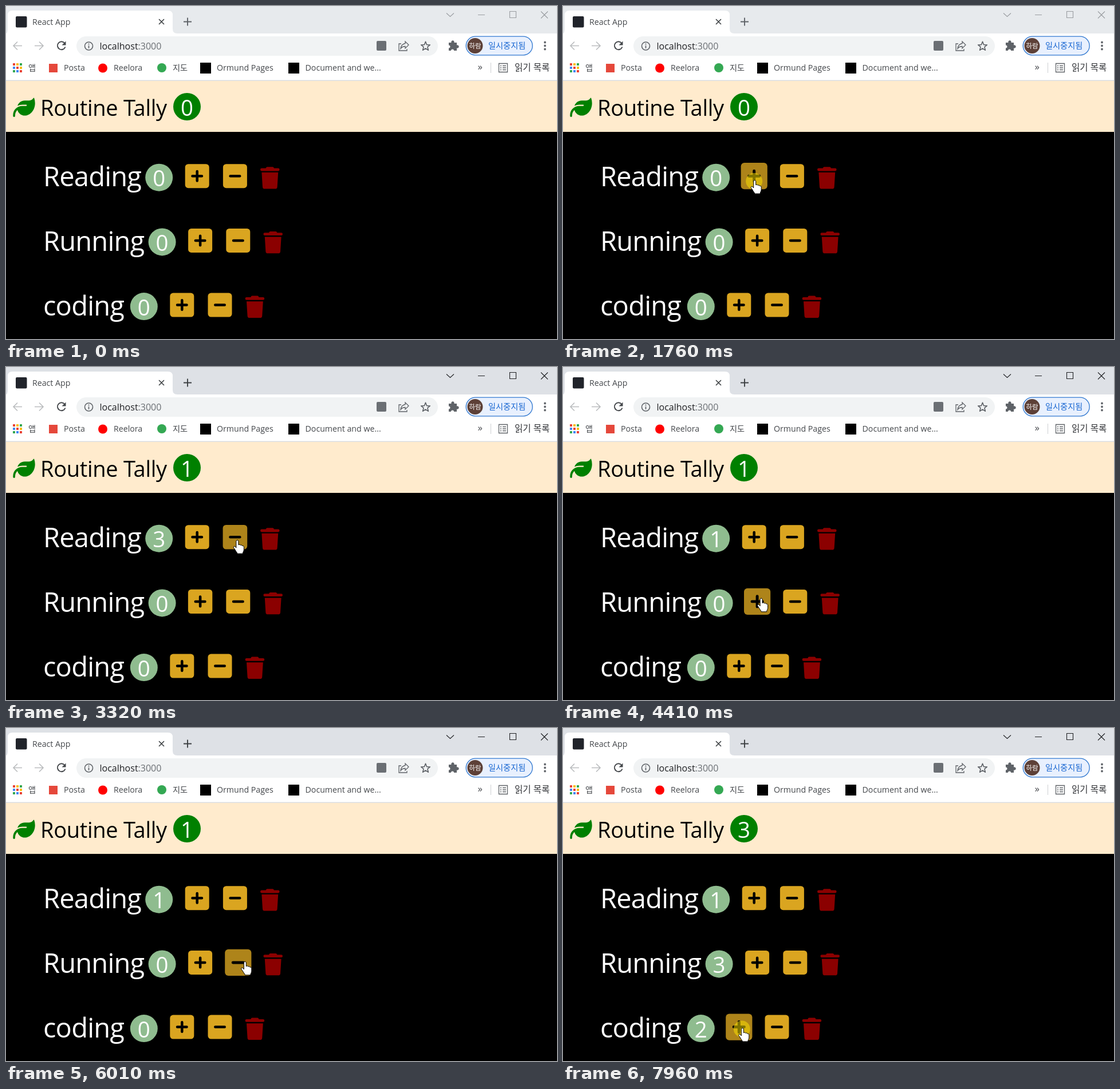
An HTML page for the animation above (8000 ms loop, 962 px wide and 582 px high).

```html
<!DOCTYPE html>
<html lang="ko">
<head>
<meta charset="utf-8">
<title>React App</title>
<style>
  html, body { margin: 0; width: 100%; height: 100%; overflow: hidden; background: #000; }
  svg { display: block; width: 100vw; height: 100vh; }
  text { font-family: "Open Sans", "Noto Sans", "Noto Sans CJK KR", sans-serif; }
  .ko { font-family: "Noto Sans CJK KR", "Noto Sans CJK", sans-serif; }
  .label { font-size: 14.2px; fill: #45484c; }
  .name { font-size: 47px; letter-spacing: -.8px; fill: #fff; }
  .count { font-size: 38.4px; fill: #fff; text-anchor: middle; }
  .line { fill: none; stroke: #5f6368; stroke-width: 1.6; }
  .thin { stroke-width: 1.3; }
  .bold { stroke: #45484c; stroke-width: 1.9; }
  .off { stroke: #babcbe; }
</style>
</head>
<body>
<svg viewBox="0 0 962 582" preserveAspectRatio="none">
  <defs>
    <path id="trash" fill="#8b0000" d="M135 18L128 32H32a32 32 0 0 0 0 64H416a32 32 0 0 0 0-64H320l-7-14q-9-18-29-18H164q-20 0-29 18zM416 128H32L53 467a48 48 0 0 0 48 45H347a48 48 0 0 0 48-45z"/>
  </defs>
  <rect width="962" height="582"/>
  <rect id="strip" width="962" height="49"/>
  <path d="M0 48Q3 47 3 40V16Q3 8 11 8H283Q291 8 291 16V40Q291 48 299 48Z" fill="#fff"/>
  <rect y="48" width="962" height="82" fill="#fff"/>
  <rect y="129.5" width="962" height="1.5" fill="#dadce0"/>

  <!-- Tab -->
  <rect x="17" y="18" width="19.5" height="19.5" rx="2" fill="#20232a"/>
  <text x="46" y="33" class="label">React App</text>
  <path d="M267 23l9 9m0-9l-9 9" class="line" style="stroke:#3c4043"/>
  <path id="newTab" d="M310 27.5h14m-7-7v14" fill="none" stroke-width="1.9"/>
  <path id="controls" fill="none" stroke-width="1.1" d="M769 12.5l6.500 6 6.500-6M824 15.500h12M879.500 9.500h11v11h-11zM934 9.500l12 12m0-12l-12 12"/>

  <!-- Toolbar -->
  <path d="M28 69.500H13m7-7l-7 7 7 7M50 69.500h15m-7-7l7 7-7 7" class="line off"/>
  <path d="M102.500 65A7 7 0 1 0 103.500 71.500" class="line bold"/>
  <path d="M104.500 61.500v7h-7z" fill="#45484c"/>
  <rect x="123" y="53" width="631" height="34" rx="17" fill="#f1f3f4"/>
  <circle cx="144.500" cy="70" r="7" class="line"/>
  <path d="M144.500 69v5m0-8.500v2" class="line"/>
  <text x="163.500" y="75.500" font-size="16" fill="#202124">localhost<tspan fill="#6b6f74">:3000</tspan></text>
  <rect x="647" y="61" width="17" height="17" rx="2" fill="#6b6f74"/>
  <path d="M690 66h-4v12h14v-3M703 68l-6-6v3.500q-7 1-8 9 3-4 8-4v3.500z" class="line thin"/>
  <path id="star" class="line" stroke-linejoin="round"/>
  <path d="M773 64h4.500a2.700 2.700 0 1 1 5 0H787v4.500a2.700 2.700 0 1 1 0 5V78h-5a2.500 2.500 0 0 0-5 0h-4v-4.500a2.500 2.500 0 0 0 0-5z" fill="#5f6368"/>
  <rect x="803.200" y="53.200" width="116" height="32.600" rx="16.300" fill="#e8f0fe" stroke="#2f77cf" stroke-width="1.300"/>
  <circle cx="819" cy="69.500" r="13.500" fill="#5d4037"/>
  <text x="819" y="74" class="ko" font-size="11.500" fill="#fff" text-anchor="middle">하람</text>
  <text x="842" y="74" class="ko" font-size="14.200" fill="#1967d2">일시중지됨</text>
  <path d="M941 63.500v12.100" stroke="#5f6368" stroke-width="3.800" stroke-linecap="round" stroke-dasharray="0 6"/>

  <!-- Bookmarks -->
  <g id="apps"></g>
  <text x="39" y="113" class="label ko">앱</text>
  <rect x="75" y="101" width="15" height="15" fill="#e5483b"/>
  <text x="101" y="113" class="label">Posta</text>
  <circle cx="169" cy="108.500" r="8" fill="#f00"/>
  <text x="188" y="113" class="label">Reelora</text>
  <circle cx="272" cy="108" r="8" fill="#34a853"/>
  <text x="291" y="113" class="label ko">지도</text>
  <rect x="339" y="99" width="19" height="19"/>
  <text x="368" y="113" class="label">Ormund Pages</text>
  <rect x="493" y="99" width="19" height="19"/>
  <text x="522.500" y="113" class="label">Document and we...</text>
  <text x="823.500" y="112" font-size="17" fill="#45484c">»</text>
  <path d="M846.500 99v18" stroke="#cfd1d4"/>
  <path d="M860.500 100.500h15v15h-15zM863 104.500h2m2 0h6M863 108h2m2 0h6M863 111.500h2m2 0h6" class="line thin"/>
  <text x="888" y="113" class="ko" font-size="15.500" fill="#303236">읽기 목록</text>

  <!-- App header -->
  <rect y="131" width="962" height="89" fill="#ffebcd"/>
  <path transform="translate(12.300 158) scale(.075)" fill="green" d="M272 96c-79 0-145 52-168 123q50-27 112-27h88a16 16 0 0 1 0 32h-88C90 224 0 320 0 440v16a24 24 0 0 0 48 0v-16q2-74 54-123c20 75 88 131 170 131 133 0 240-131 240-291q0-63-21-120-6-10-16 0c-19 35-57 59-99 59z"/>
  <text x="60" y="191.500" font-size="38" letter-spacing="-.3">Routine Tally</text>
  <circle cx="316" cy="176" r="24" fill="green"/>
  <text id="total" x="316" y="191.500" class="count">0</text>

  <g id="rows"></g>
  <circle id="halo" r="14.500" fill="#ffe600" opacity=".5"/>
  <g id="cursor" fill="#fff" stroke="#000" stroke-linejoin="round">
    <path id="hand" d="M-1 0q2-3.500 4 0v6.500q2.500-1.500 3.500.6 2-1.200 3 1 2-.8 3 1.800v5c0 3-2 4-2 7H1c0-2-2-3-4-7l-2.500-3.500q0-3.500 3-1.600l1.500 2z"/>
    <path id="arrow" d="M0 0v17l4-3.700 2.600 6 2.700-1.100-2.600-5.900H12z"/>
  </g>
</svg>
<script>
const LOOP = 8000;
const HOLD = 70;    // how long the mouse button stays down
const EDGE = 60;    // the pointer crosses a button's border this long before and after a stop
const GROW = 300;   // hover transition

const $ = id => document.getElementById(id);
const clamp = v => Math.min(1, Math.max(0, v));
const smooth = x => x * x * (3 - 2 * x);
const ease = x => 1 - (1 - smooth(clamp(x))) ** 1.7;

const habits = [["Reading", 267.2], ["Running", 272.6], ["coding", 240.8]]
  .map(([name, x], i) => ({ name, x, y: 297.2 + 112.7 * i }));

const button = (row, sign) => ({
  row, sign,
  x: habits[row].x + (sign > 0 ? 66.5 : 132.7),
  y: habits[row].y
});
const buttons = habits.flatMap((_, row) => [button(row, 1), button(row, -1)]);

// A stay of the pointer on a button, off its centre by dx, dy, with its clicks
function stop(row, sign, dx, dy, from, to, ...presses) {
  const target = buttons.find(b => b.row === row && b.sign === sign);
  return { target, x: target.x + dx, y: target.y + dy, from, to, presses };
}
const stops = [
  stop(2, -1, 2, -3, 1070, 1070),
  stop(0, 1, 0, 9, 1490, 2420, 1760, 2030, 2350),
  stop(0, -1, 0, 9, 2620, 2720),
  stop(1, 1, 8, 7, 2960, 3060),
  stop(0, -1, 3, 7, 3325, 3940, 3600, 3870),
  stop(1, 1, 6, -4, 4200, 5070, 4540, 4740),
  stop(1, -1, 11, 0, 5340, 6010, 5410, 5740, 5940),
  stop(1, 1, 4, 5, 6280, 6890, 6410, 6610, 6820),
  stop(2, 1, 5, 3.5, 7360, LOOP, 7500, 7700, 7960)
];
const clicks = stops.flatMap(s => s.presses.map(time => ({ time, ...s.target })));
const enterTime = stops[0].from - EDGE;
const focusTime = clicks[0].time + HOLD;

function pointer(t) {
  const i = stops.findIndex(s => t < s.to);
  const b = stops[i], a = stops[i - 1] || b;
  const k = smooth(clamp((t - a.to) / (b.from - a.to)));
  return [a.x + (b.x - a.x) * k, a.y + (b.y - a.y) * k];
}

const drawButton = ({ sign }) => `<g class="btn">
  <rect x="-21" y="-21" width="42" height="42" rx="5.5"/>
  <path d="M-8.25 0H8.25${sign > 0 ? "M0-8.25V8.25" : ""}" stroke="#000" stroke-width="4.5" stroke-linecap="round"/></g>`;

$("rows").innerHTML = habits.map(({ name, x, y }) => `
  <text x="65" y="${y + 18}" class="name">${name}</text>
  <circle cx="${x}" cy="${y + 2.5}" r="24" fill="#8fbc8f"/>
  <text x="${x}" y="${y + 18}" class="count num">0</text>
  <use href="#trash" transform="translate(${x + 176.8} ${y - 16}) scale(.075)"/>`).join("")
  + buttons.map(drawButton).join("");

const hues = ["#ea4335", "#fbbc04", "#34a853", "#4285f4"];
$("apps").innerHTML = Array.from({ length: 9 }, (_, i) =>
  `<rect x="${12 + i % 3 * 6}" y="${100 + Math.floor(i / 3) * 6}" width="4" height="4" fill="${hues[i % 4]}"/>`).join("");

$("star").setAttribute("d", "M" + Array.from({ length: 10 }, (_, i) => {
  const r = i % 2 ? 3.6 : 8.3, a = i * Math.PI / 5;
  return `${732.5 + r * Math.sin(a)} ${70.5 - r * Math.cos(a)}`;
}).join("L") + "Z");

const shapes = [...document.querySelectorAll(".btn")];
const numbers = [...document.querySelectorAll(".num")];
const set = (el, name, value) => el.setAttribute(name, value);
const show = (id, on) => set($(id), "visibility", on ? "visible" : "hidden");

function drawWindow(focused) {
  set($("strip"), "fill", focused ? "#dee1e6" : "#e7eaed");
  set($("controls"), "stroke", focused ? "#202124" : "#9a9da1");
  set($("newTab"), "stroke", focused ? "#3c4043" : "#5f6368");
}

function drawCounts(t) {
  const counts = habits.map(() => 0);
  for (const c of clicks)
    if (t >= c.time + HOLD) counts[c.row] = Math.max(0, counts[c.row] + c.sign);
  numbers.forEach((n, i) => n.textContent = counts[i]);
  $("total").textContent = counts.filter(c => c > 0).length;
}

function drawButtons(t) {
  buttons.forEach((b, i) => {
    let grow = 0, hot = false;
    for (const s of stops.filter(s => s.target === b)) {
      const on = s.from - EDGE, off = s.to + EDGE;
      grow += ease((t - on) / GROW) - ease((t - off) / GROW);
      hot = hot || (t >= on && t < off);
    }
    set(shapes[i], "transform", `translate(${b.x} ${b.y}) scale(${1 + .1 * grow})`);
    set(shapes[i], "fill", hot ? "#ae841a" : "#daa520");
  });
}

function drawPointer(t) {
  const place = `translate(${pointer(t).join(" ")})`;
  const over = stops.some(s => t >= s.from - EDGE && t < s.to + EDGE);
  set($("cursor"), "transform", place);
  set($("halo"), "transform", place);
  show("hand", over);
  show("arrow", t >= enterTime && !over);
  show("halo", clicks.some(c => t >= c.time && t < c.time + HOLD));
}

function draw(t) {
  drawWindow(t >= focusTime);
  drawCounts(t);
  drawButtons(t);
  drawPointer(t);
}

function tick() {
  draw(performance.now() % LOOP);
  requestAnimationFrame(tick);
}
tick();
</script>
</body>
</html>
```
